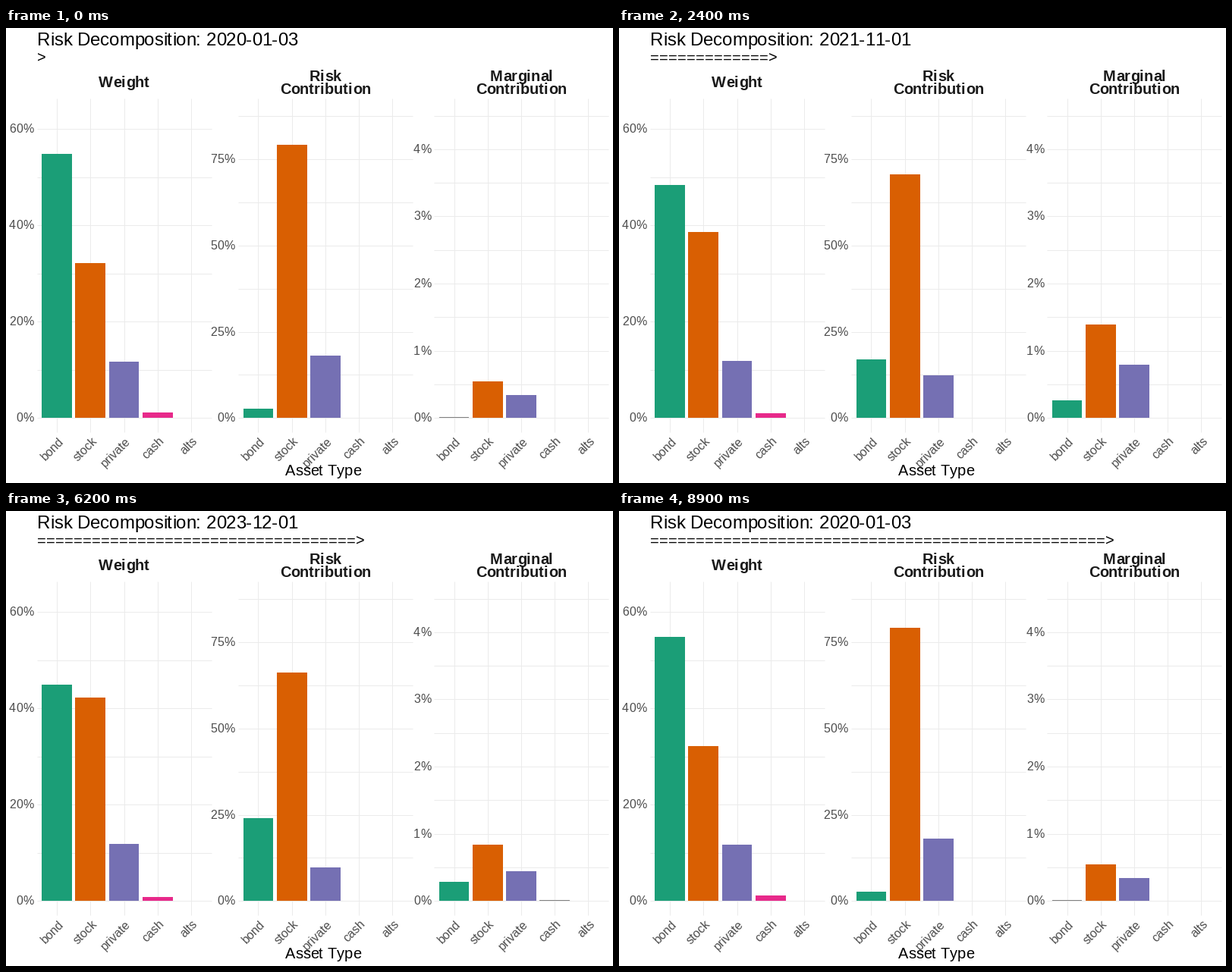
Write a matplotlib script that moves like this. It is 800x600 px and loops after 10 s.

```python
import matplotlib.pyplot as plt
import numpy as np
from matplotlib.animation import FuncAnimation
from matplotlib.patches import Rectangle
from matplotlib.textpath import text_to_path

plt.rcParams["font.family"] = "Liberation Sans"

W, H, DPI = 800, 600, 100
FRAMES, LAST = 100, 89          # the final picture rests until the loop ends
ASSETS = ["bond", "stock", "private", "cash", "alts"]
COLORS = ["#1B9E77", "#D95F02", "#7570B3", "#E7298A", "#66A61E"]
THIN = "#808080"
BASE, TOP, BOTTOM, PANEL_W = 514.4, 93, 533, 230
STEP = PANEL_W / 5.2

# title lines, left edge, pixels per percent, major step, minor step, grid end
PANELS = [
    (["Weight"], 40.5, 6.35, 20, 10, 60),
    (["Risk", "Contribution"], 305.95, 4.555, 25, 12.5, 87.5),
    (["Marginal", "Contribution"], 564, 88.64, 1, 0.5, 4.5),
]

# Key months: stock, private, cash weight; bond, stock, private marginal risk
KEYS = {
    0: (32.25, 11.75, 1.2, 0.011, 0.546, 0.343),
    11: (37.2, 11.55, 1.05, 0.117, 1.19, 0.625),
    30: (39.75, 12.2, 1.0, 0.377, 1.54, 0.92),
    40: (41.41, 11.97, 0.93, 0.278, 0.685, 0.456),
    47: (42.3, 11.9, 0.85, 0.287, 0.84, 0.445),
    56: (43.8, 12.0, 0.85, 0.142, 1.005, 0.582),
}

# First trading day of each month
HOLIDAYS = ["2020-01-01", "2020-01-02", "2021-01-01", "2023-01-02",
            "2024-01-01", "2024-09-02", "2025-01-01"]
MONTHS = np.arange("2020-01", "2025-05", dtype="datetime64[M]")
DATES = [str(np.busday_offset(m.astype("datetime64[D]"), 0, roll="forward",
                              holidays=HOLIDAYS)) for m in MONTHS]


def month_at(f):
    """Nearly a month per frame at first, then slower, in half-month steps."""
    if f >= LAST:
        return 0
    return round(2 * min(f * 11 / 12, 8 + 0.625 * f)) / 2


def portfolio(m):
    """Weight, risk share and marginal risk of each asset, in percent."""
    stock, private, cash, bond_m, stock_m, private_m = (
        np.interp(m, list(KEYS), column) for column in zip(*KEYS.values()))
    # Market shock that peaks in the third month and fades within the year
    shock = (m / 3 * np.exp(1 - m / 3)) ** 5
    stock -= 7.5 * shock
    private -= 1.1 * shock
    stock_m += 3.8 * shock
    private_m += 1.0 * shock
    alts = np.clip(m - 48, 0, 1)
    cash_m = 0.011 if 26 <= m < 38 or 44 <= m < 52 else 0

    bond = 100 - stock - private - cash - 0.2 * alts
    weight = np.array([bond, stock, private, cash, 0.2 * alts])
    marginal = np.array([bond_m, stock_m, private_m, cash_m, 2 * alts])
    risk = weight * marginal
    return weight, 100 * risk / risk.sum(), marginal


fig = plt.figure(figsize=(W / DPI, H / DPI), dpi=DPI, facecolor="white")
ax = fig.add_axes([0, 0, 1, 1])
ax.set_xlim(0, W)
ax.set_ylim(H, 0)
ax.axis("off")


def text(x, y, s, px, color="black", **kw):
    return ax.text(x, y, s, fontsize=px * 72 / DPI, color=color, zorder=3,
                   va="baseline", **kw)


def spell(x, y, s, px, color="black", align=0, **kw):
    """Set text glyph by glyph on whole pixels; align 0 left, 1 right."""
    glyphs = [text(0, y, c, px, color, **kw) for c in s]
    steps = [round(text_to_path.get_text_width_height_descent(
        g.get_text(), g.get_fontproperties(), False)[0] * DPI / 72)
        for g in glyphs]
    x = round(x - align * sum(steps))
    for g, step in zip(glyphs, steps):
        g.set_x(x)
        x += step
    return glyphs


def rewrite(glyphs, s):
    for g, c in zip(glyphs, s.ljust(len(glyphs))):
        g.set_text(c.strip())


def grid_line(xs, ys):
    ax.plot(xs, ys, color="#EBEBEB", lw=72 / DPI, zorder=1,
            solid_capstyle="butt")


def make_panel(lines, left, scale, major, minor, end):
    for v in np.arange(0, end + minor / 2, minor):
        y = BASE - v * scale
        grid_line([left, left + PANEL_W], [y, y])
        if v % major == 0:
            spell(left - 4.47, round(y) + 5, f"{v:.0f}%", 16, "#4D4D4D", align=1)
    bars = []
    for k, name in enumerate(ASSETS):
        x = left + STEP * (0.6 + k)
        grid_line([x, x], [TOP, BOTTOM])
        text(x + 9.5, 545.5, name, 16, "#4D4D4D", ha="right", rotation=45,
             rotation_mode="anchor")
        x0, x1 = round(x - 0.45 * STEP), round(x + 0.45 * STEP)
        bar = Rectangle((x0, 514), x1 - x0, 0, fc=COLORS[k], lw=0, zorder=2)
        bars.append(ax.add_patch(bar))
    first = 78 if len(lines) == 1 else 70
    for i, s in enumerate(lines):
        spell(left + PANEL_W / 2, first + 17 * i, s, 20, "#1A1A1A", align=0.5,
              weight="bold")
    return bars


bars = [make_panel(*p) for p in PANELS]
title = spell(41, 23, "Risk Decomposition: " + DATES[0], 24)
arrow = spell(41, 46, "=" * 50 + ">", 20)
spell(418, 590, "Asset Type", 20, align=0.5)


def draw(frame):
    f = min(frame, LAST)
    month = month_at(f)
    rewrite(title, "Risk Decomposition: " + DATES[int(month + 0.5)])
    rewrite(arrow, "=" * round(50 * f / LAST) + ">")
    for (_, _, scale, *_), values, group in zip(PANELS, portfolio(month), bars):
        for bar, value, color in zip(group, values, COLORS):
            top = round(BASE - value * scale)
            bar.set_y(top)
            bar.set_height(514 - top)
            bar.set_facecolor(THIN if top == 513 else color)
            bar.set_visible(top < 514)
    return title + arrow + sum(bars, [])


anim = FuncAnimation(fig, draw, frames=FRAMES, interval=100, repeat=True,
                     repeat_delay=0, init_func=lambda: draw(0), blit=False)
plt.show()
```
